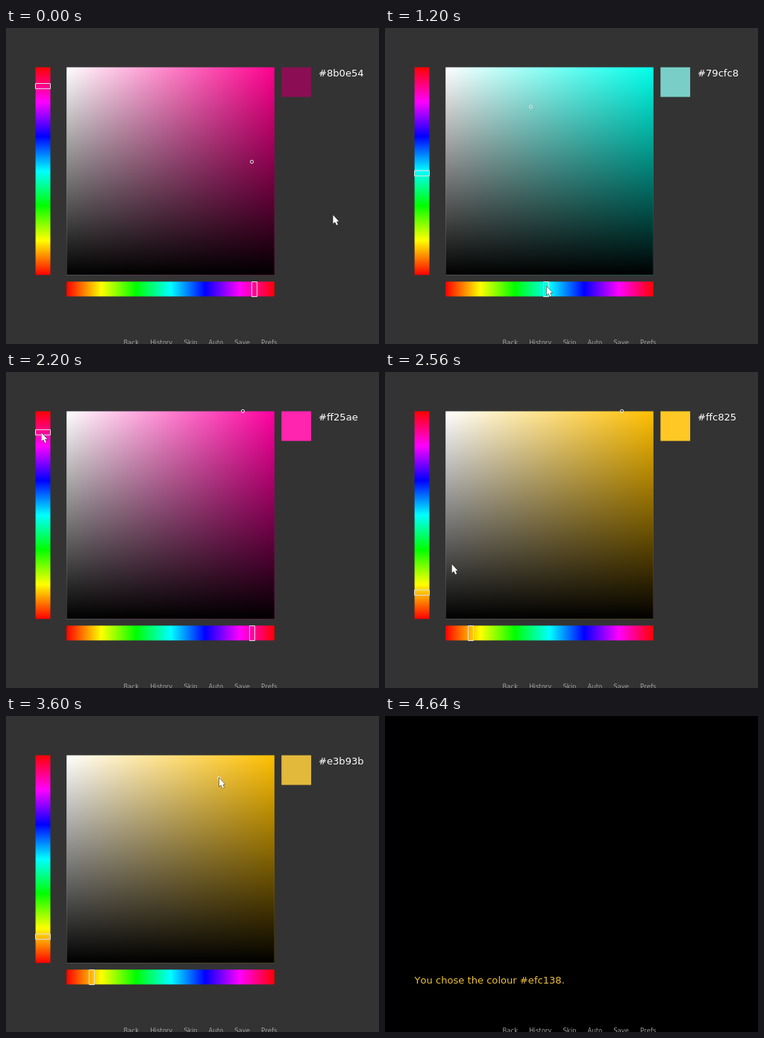
Animation of 500 by 424 pixels, one loop 4.76 s. Source, as an HTML page with a canvas:

```html
<!DOCTYPE html>
<html lang="en">
<head>
<meta charset="utf-8">
<title>Colour picker</title>
<style>
  html, body { margin: 0; width: 100%; height: 100%; overflow: hidden; background: #333; }
  canvas { display: block; }
</style>
</head>
<body>
<canvas id="stage" width="500" height="424"></canvas>
<script>
const ctx = document.getElementById('stage').getContext('2d');
ctx.fontKerning = 'none';

const LOOP = 4760, STEP = 40, CHOSEN = 4200, CURSOR_GONE = 4640;
const LEFT = 81.2, TOP = 52.7, SIDE = 278.6, BAR = 19.9;
const BAR_X = 39.6, BAR_Y = 340.3;

function toHsv(code) {
  const [r, g, b] = [1, 3, 5].map(i => parseInt(code.slice(i, i + 2), 16) / 255);
  const v = Math.max(r, g, b), range = v - Math.min(r, g, b);
  const sector = v === r ? (g - b) / range + 6 : v === g ? (b - r) / range + 2 : (r - g) / range + 4;
  return { h: sector % 6 / 6, s: range / v, v };
}

function toHex({ h, s, v }) {
  return '#' + [5, 3, 1].map(n => {
    const k = (n + h * 6) % 6;
    const level = v * (1 - s * Math.max(0, Math.min(k, 4 - k, 1)));
    return Math.round(level * 255).toString(16).padStart(2, '0');
  }).join('');
}

// Each control changes some colour channels and has a handle at a place set by the colour.
const tone = { keys: ['s', 'v'], place: c => ({ x: LEFT + c.s * (SIDE - 2) - .5, y: TOP + (1 - c.v) * SIDE }) };
const across = { keys: ['h'], place: c => ({ x: LEFT + c.h * SIDE - .5, y: BAR_Y + 6.5 }) };
const upright = { keys: ['h'], place: c => ({ x: BAR_X + 7.5, y: TOP + (1 - c.h) * SIDE - .5 }) };
const hover = (x, y) => ({ keys: [], place: () => ({ x, y }) });

// [press time, release time, control, colour picked]
const gestures = [
  [0, 0, hover(438, 251)],
  [360, 640, tone, '#cf79a9'],
  [960, 1200, across, '#79cfc8'],
  [1600, 1840, tone, '#ff25ae'],
  [2040, 2200, upright, '#ff25ae'],
  [2240, 2520, upright, '#efc138'],
  [2680, 2800, tone, '#bb9a39'],
  [2920, 3000, hover(256, 264)],
  [3280, 3600, tone, '#e3b93b'],
  [3640, 3760, tone, '#efc138'],
  [4160, LOOP, hover(435, 290)]
];

function mix(a, b, p) {
  const eased = p * p * (3 - 2 * p);
  const out = {};
  for (const key in a) out[key] = a[key] + (b[key] - a[key]) * eased;
  return out;
}

function pose(t) {
  let color = toHsv('#8b0e54'), cursor, last = 0;
  for (const [press, release, control, code] of gestures) {
    if (t < press) {
      cursor = mix(cursor, control.place(color), (t - last) / (press - last));
      break;
    }
    const goal = { ...color };
    for (const key of control.keys) goal[key] = toHsv(code)[key];
    color = t < release ? mix(color, goal, (t - press) / (release - press)) : goal;
    cursor = control.place(color);
    if (t < release) break;
    last = release;
  }
  return { color, cursor };
}

function gradient(x0, y0, x1, y1, colors) {
  const g = ctx.createLinearGradient(x0, y0, x1, y1);
  colors.forEach((c, i) => g.addColorStop(i / (colors.length - 1), c));
  return g;
}

function fill(style, x, y, w, h) {
  ctx.fillStyle = style;
  ctx.fillRect(x, y, w, h);
}

function text(str, x, y, size, color) {
  ctx.font = `${size}px "DejaVu Sans", sans-serif`;
  ctx.fillStyle = color;
  ctx.fillText(str, x, y);
  return ctx.measureText(str).width;
}

function handle(x, y, w, h, radius = 0) {
  ctx.beginPath();
  ctx.roundRect(Math.round(x - w / 2) + .5, Math.round(y - h / 2) + .5, w - 1, h - 1, radius);
  ctx.strokeStyle = '#ddd';
  ctx.lineWidth = 1;
  ctx.stroke();
}

const pure = h => toHex({ h, s: 1, v: 1 });
const wheel = [0, 1, 2, 3, 4, 5, 6].map(i => pure(i / 6));
const RIGHT = LEFT + SIDE, BOTTOM = TOP + SIDE;
const acrossHues = gradient(LEFT, 0, RIGHT, 0, wheel);
const uprightHues = gradient(0, BOTTOM, 0, TOP, wheel);
const shade = gradient(0, TOP, 0, BOTTOM, ['#0000', '#000']);

function drawPicker(color) {
  const code = toHex(color);
  fill('#333', 0, 0, 500, 424);
  fill(gradient(LEFT, 0, RIGHT, 0, ['#fff', pure(color.h)]), LEFT, TOP, SIDE, SIDE);
  fill(shade, LEFT, TOP, SIDE, SIDE);
  fill(uprightHues, BAR_X, TOP, BAR, SIDE);
  fill(acrossHues, LEFT, BAR_Y, SIDE, BAR);
  fill(code, 369.3, TOP, 2 * BAR, 2 * BAR);
  const spot = tone.place(color);
  handle(spot.x, spot.y, 5, 5, 1.5);
  handle(across.place(color).x, BAR_Y + BAR / 2, 8, 21);
  handle(BAR_X + BAR / 2, upright.place(color).y, 21, 8);
  text(code, 419, 65, 13.1, '#fff');
}

function drawMenu() {
  let x = 157.5;
  for (const name of ['Back', 'History', 'Skip', 'Auto', 'Save', 'Prefs']) {
    x += text(name, x, 425, 8.5, '#a0a0a0') + 15;
  }
}

const arrow = new Path2D('M0 0V11.5L2.6 9.2 4.6 13.6 6.5 12.8 4.7 8.5H7.8Z');
function drawCursor({ x, y }) {
  ctx.save();
  ctx.translate(x + .4, y);
  ctx.strokeStyle = '#222';
  ctx.lineWidth = 1;
  ctx.stroke(arrow);
  ctx.fillStyle = '#fff';
  ctx.fill(arrow);
  ctx.restore();
}

function draw(now) {
  const t = Math.floor(now % LOOP / STEP) * STEP;
  const { color, cursor } = pose(t);
  if (t < CHOSEN) {
    drawPicker(color);
  } else {
    fill('#000', 0, 0, 500, 424);
    text(`You chose the colour ${toHex(color)}.`, 39.5, 359, 13.1, toHex(color));
  }
  drawMenu();
  if (t < CURSOR_GONE) drawCursor(cursor);
}

const start = performance.now();
(function tick() {
  draw(performance.now() - start);
  requestAnimationFrame(tick);
})();
</script>
</body>
</html>
```
